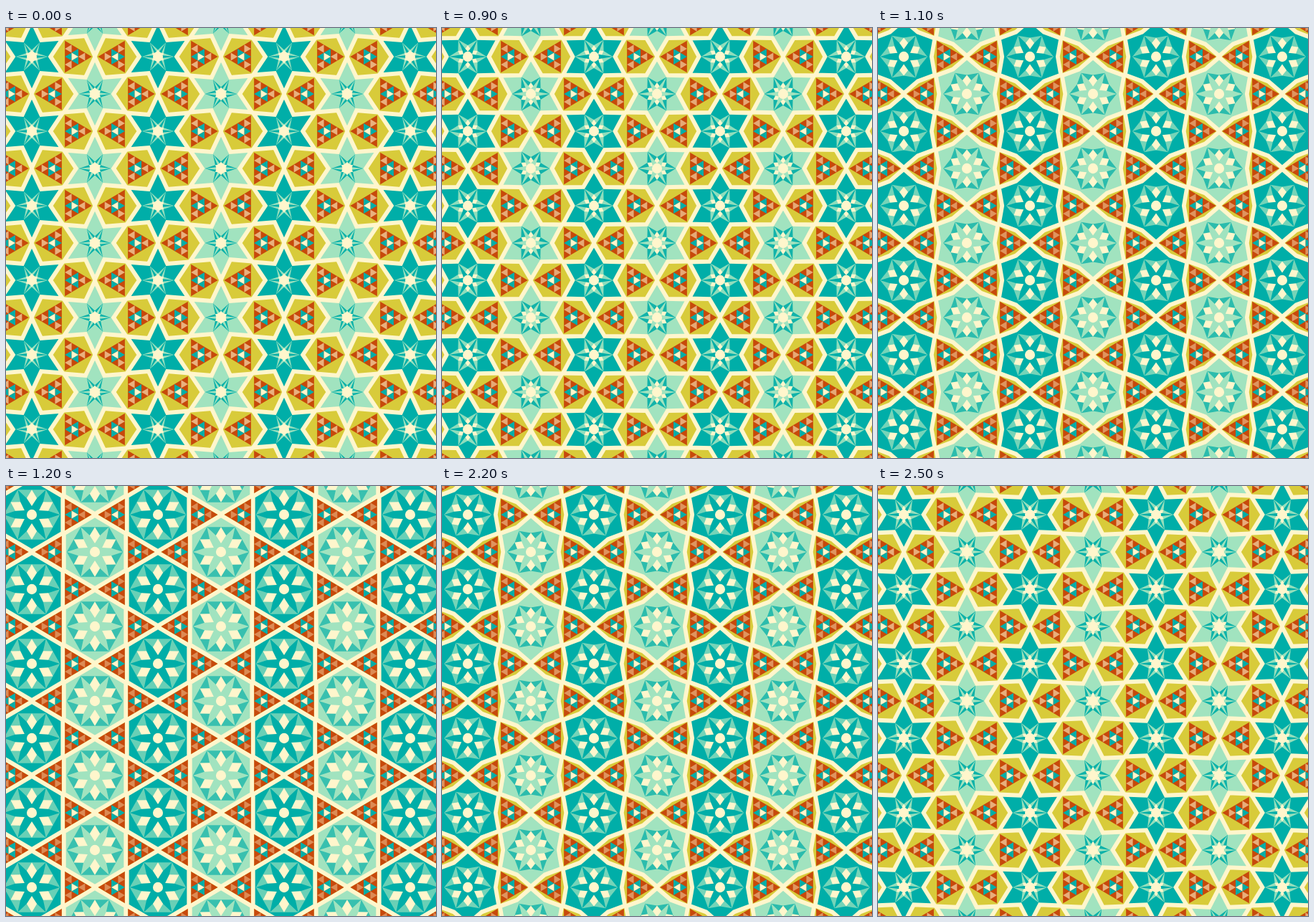
Recreate the animation shown at these times as an HTML page with a canvas. Size 600x600 px, loop 2.6 s.

```html
<!DOCTYPE html>
<html lang="en">
<head>
<meta charset="utf-8">
<title>Rosette tiling</title>
<style>
html, body { margin: 0; width: 100%; height: 100%; overflow: hidden; background: #fff6cc; }
canvas { display: block; width: 600px; height: 600px; }
</style>
</head>
<body>
<canvas id="stage" width="600" height="600"></canvas>
<script>
const ctx = document.getElementById('stage').getContext('2d');

const CREAM = '#fff6cc', TEAL = '#00aea8', MINT = '#a1e3bf';
const YELLOW = '#d8cb3a', ORANGE = '#c7490b';
const COL = 88, ROW = 104, SIDE = 52;
const APOTHEM = SIDE * Math.sqrt(3) / 2;
const SQUASH = COL / 2 / APOTHEM;
const SHRINK = 1 - 0.8 / APOTHEM; // grid lines lean into the rosettes
const LOOP = 2600;

// One pose per step of the swing, from folded star to open hexagon:
// bend of the grid lines, star tip and valley radius,
// kite shoulder height, shoulder half width, kite bottom
const POSES = [
  [17.8, 22.8, 9.5, 7, 2, 4],
  [16.4, 24.6, 12.3, 8.5, 2.6, 4],
  [14.3, 27, 16, 11, 3.6, 7],
  [10, 30, 20.5, 15, 4.8, 9],
  [4.6, 33.8, 26.5, 19, 6.2, 10.5],
  [0, 40.2, 34.8, 23, 7.3, 12],
  [-1.4, 41.3, 36, 24, 7.6, 12.5]
].map(([bend, tip, valley, shoulder, half, bottom]) =>
  ({ bend, tip, valley, shoulder, half, bottom }));

function poseAt(t) {
  if (t < 100) return 0;
  if (t < 900) return 1;
  if (t < 1400) return 2 + Math.floor((t - 900) / 100);
  if (t < 2200) return 5;
  return 4 - Math.floor((t - 2200) / 100);
}

const polar = (r, deg) => {
  const a = deg * Math.PI / 180;
  return [r * Math.cos(a), r * Math.sin(a)];
};

// Repeats a few polar points [radius, degrees] around six sectors
function sixfold(points) {
  const all = [];
  for (let a = 0; a < 360; a += 60)
    for (const [r, deg] of points) all.push(polar(r, a + deg));
  return all;
}

function trace(points) {
  ctx.beginPath();
  points.forEach(([x, y]) => ctx.lineTo(x, y));
  ctx.closePath();
}

function fill(points, color) {
  trace(points);
  ctx.fillStyle = color;
  ctx.fill();
}

const place = (x, y, flip = 1) => ctx.setTransform(SQUASH * flip, 0, 0, 1, x, y);

function eachCell(draw) {
  for (let i = -1; i < 8; i++)
    for (let j = -1; j < 7; j++)
      draw(36 + i * COL, 40 + (i & 1 ? ROW / 2 : 0) + j * ROW, i & 1);
}

const outline = p => sixfold([[(APOTHEM - p.bend) * SHRINK, 0], [SIDE * SHRINK, 30]]);

function rosette(p, odd, fade) {
  const base = odd ? MINT : TEAL, accent = odd ? TEAL : MINT;
  const spread = Math.atan2(p.half, p.shoulder) * 180 / Math.PI;
  const reach = Math.hypot(p.half, p.shoulder);

  fill(outline(p), base);
  ctx.globalAlpha = 0.65 + 0.3 * fade;
  fill(sixfold([[p.tip, 0], [p.valley, 30]]), accent);
  ctx.globalAlpha = 1;
  fill(sixfold([[p.tip, 0], [reach, 30 - spread], [reach, 30 + spread]]), base);
  for (let a = 30; a < 390; a += 60)
    fill([polar(p.valley, a), polar(reach, a + spread), polar(p.bottom, a), polar(reach, a - spread)], CREAM);
  ctx.beginPath();
  ctx.arc(0, 0, 7.2, 0, 7);
  ctx.fillStyle = CREAM;
  ctx.fill();
}

// Triangle with its tip at the left, cut into four rows
function triangle(fade) {
  const inset = 2.2, x0 = 2 * inset;
  const h = (APOTHEM - 3 * inset) / 4, s = h / Math.sqrt(3);
  const cell = (row, y, dir) => {
    const flat = x0 + (dir > 0 ? row : row + 1) * h;
    return [[flat, y * s - s], [flat, y * s + s], [flat + dir * h, y * s]];
  };
  fill([[x0, 0], [x0 + 4 * h, -4 * s], [x0 + 4 * h, 4 * s]], ORANGE);
  ctx.globalAlpha = 0.38 + 0.22 * fade;
  [[1, 0], [3, -2], [3, 2]].forEach(([row, y]) => fill(cell(row, y, 1), CREAM));
  ctx.globalAlpha = 1;
  [[2, -1], [2, 1], [3, 0]].forEach(([row, y]) => fill(cell(row, y, 1), TEAL));
  fill(cell(2, 0, -1), CREAM);
}

function paint(p) {
  const fade = Math.max(0, p.bend / POSES[0].bend);
  ctx.setTransform(1, 0, 0, 1, 0, 0);
  ctx.fillStyle = YELLOW;
  ctx.fillRect(0, 0, 600, 600);

  eachCell((x, y, odd) => {
    place(x, y);
    rosette(p, odd, fade);
  });
  eachCell((x, y) => {
    for (const flip of [1, -1]) {
      place(x, y - SIDE, flip);
      triangle(fade);
    }
  });
  ctx.strokeStyle = CREAM;
  ctx.lineWidth = 5.9;
  ctx.lineJoin = 'miter';
  eachCell((x, y) => {
    place(x, y);
    trace(outline(p));
    ctx.stroke();
  });
}

let shown = -1;
const start = performance.now();

function tick() {
  const pose = poseAt((performance.now() - start) % LOOP);
  if (pose !== shown) paint(POSES[shown = pose]);
  requestAnimationFrame(tick);
}
tick();
</script>
</body>
</html>
```
